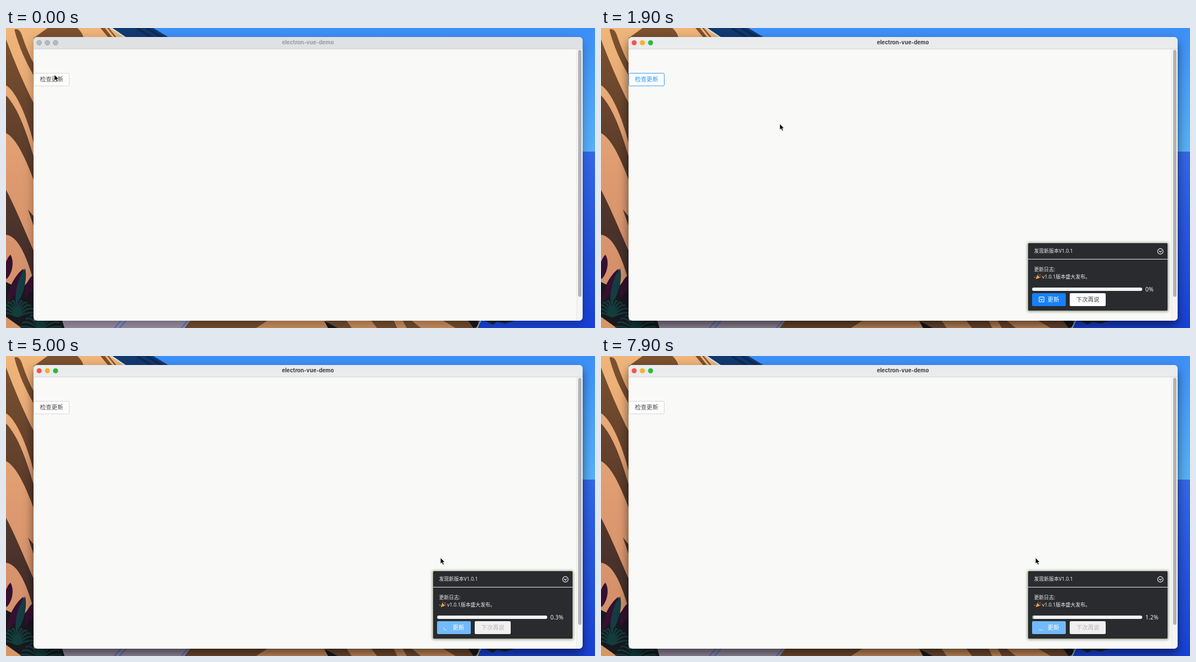
Animation, 1048 px wide and 534 px high, one loop 8 s. Source, as an HTML page:

```html
<!DOCTYPE html>
<html lang="zh-CN">
<head>
<meta charset="utf-8">
<title>electron-vue-demo</title>
<style>
  html, body { margin: 0; width: 100%; height: 100%; overflow: hidden; }
  svg { display: block; width: 1048px; height: 534px; }
  text { font: 10.3px "Noto Sans", "Noto Sans CJK SC", "Noto Sans CJK", sans-serif; }
  .title { font: 700 9.7px Inter, sans-serif; text-anchor: middle; fill: #3b3b3c; }
  .small { font-size: 8.8px; fill: #ececec; }

  .off, .on, .panel, .ring, .busy, .idle, .later { animation: 8s step-end infinite; }
  .off { animation-name: off; }
  .on { animation-name: on; }
  .panel { animation-name: panel; }
  .ring { animation-name: ring; }
  .busy { animation-name: busy; }
  .idle { animation-name: idle; }
  .later { animation-name: later; }
  @keyframes off { 0% { opacity: 1 } 8.75%, 100% { opacity: 0 } }
  @keyframes on { 0% { opacity: 0 } 8.75%, 100% { opacity: 1 } }
  @keyframes panel { 0% { opacity: 0 } 18.75%, 100% { opacity: 1 } }
  @keyframes ring {
    0%, 12.5%, 43.75%, 100% { opacity: 0 }
    8.75%, 41.25% { opacity: 1 }
  }
  @keyframes busy { 0% { opacity: 0 } 42.5%, 100% { opacity: 1 } }
  @keyframes idle { 0% { opacity: 1 } 42.5%, 100% { opacity: 0 } }
  @keyframes later {
    0% { fill: #fdfdfd; color: #444 }
    51.25%, 100% { fill: #f0f0f0; color: #b6b6b6 }
  }
  .later text { fill: currentColor; }

  .check { animation: check 8s linear infinite; stroke: currentColor; }
  .check text { stroke: none; animation: ink 8s linear infinite; }
  @keyframes check {
    0%, 10.6%, 46.9%, 100% { color: #d6d6d6 }
    15%, 42.5% { color: #3a9cf2 }
  }
  @keyframes ink {
    0%, 10.6%, 46.9%, 100% { fill: #484848 }
    15%, 42.5% { fill: #2b96f3 }
  }

  .spin { transform-origin: 783.5px 483.5px; animation: spin 1s steps(10) infinite; }
  @keyframes spin { to { transform: rotate(360deg) } }

  .cursor { animation: move 8s infinite; }
  @keyframes move {
    0% { transform: translate(86px, 83px) }
    2.5% { transform: translate(86px, 83px); animation-timing-function: steps(3) }
    6.25% { transform: translate(92px, 93px) }
    15% { transform: translate(92px, 93px); animation-timing-function: steps(3) }
    18.75% { transform: translate(160px, 115px); animation-timing-function: steps(4) }
    23.75% { transform: translate(318px, 170.5px); animation-timing-function: steps(4) }
    28.75% { transform: translate(560px, 330px); animation-timing-function: steps(4) }
    33.75% { transform: translate(780px, 470px); animation-timing-function: steps(3) }
    37.5% { transform: translate(795px, 484px) }
    43.75% { transform: translate(795px, 484px); animation-timing-function: steps(2) }
    46.25% { transform: translate(773px, 360px); animation-timing-function: step-end }
    48.75%, 100% { transform: translate(773px, 359px) }
  }
</style>
</head>
<body>
<svg viewBox="0 0 1048 534">
  <defs>
    <linearGradient id="sky" x2="0" y2="1">
      <stop stop-color="#3d8ff8"/><stop offset="1" stop-color="#58b1f8"/>
    </linearGradient>
    <linearGradient id="sea" x2="0" y2="1">
      <stop stop-color="#3468e8"/><stop offset="1" stop-color="#1841d4"/>
    </linearGradient>
    <linearGradient id="sand" gradientUnits="userSpaceOnUse" x2="0" y2="534">
      <stop stop-color="#f0b57a"/><stop offset=".5" stop-color="#dd9a70"/><stop offset="1" stop-color="#d08b68"/>
    </linearGradient>
    <linearGradient id="rock" gradientUnits="userSpaceOnUse" x2="0" y2="480">
      <stop stop-color="#7d5230"/><stop offset=".5" stop-color="#5a3b2b"/><stop offset="1" stop-color="#3c2a2c"/>
    </linearGradient>
    <filter id="blur" x="-10%" y="-10%" width="120%" height="120%"><feGaussianBlur stdDeviation="9"/></filter>
    <filter id="glow" x="-10%" y="-15%" width="120%" height="130%"><feGaussianBlur stdDeviation="2.2"/></filter>
    <clipPath id="bar"><rect x="767" y="462" width="196" height="6" rx="3"/></clipPath>
    <path id="head" d="M49 37V23Q49 16 56 16H1019Q1026 16 1026 23V37Z"/>
    <path id="leaf" d="M0 0C-9 -12 -8 -34 0 -44C9 -34 9 -12 0 0Z"/>
  </defs>

  <!-- desktop -->
  <rect width="1048" height="222" fill="url(#sky)"/>
  <rect y="220" width="1048" height="314" fill="url(#sea)"/>
  <path d="M180 0H262L292 18H200Z" fill="#123a70"/>
  <path d="M232 0L262 18M250 0L280 18" stroke="#0d2c58" stroke-width="4"/>
  <path d="M0 0H187L214 18H49V534H0Z" fill="url(#sand)"/>
  <path d="M187 0L214 18" stroke="#cfe3e0" stroke-width="2.5"/>
  <g fill="url(#rock)">
    <path d="M74 0H127Q136 8 138 18H49Z"/>
    <path d="M15 3C20 0 25 4 28 12C34 30 42 50 49 62V84C36 62 22 32 15 3Z"/>
    <path d="M168 0H176L190 18H183ZM180 0H183L198 18H195Z"/>
    <path d="M0 20C14 58 34 104 49 133V204C38 160 18 112 0 102Z"/>
    <path d="M0 120C18 138 34 176 49 228V270C34 230 18 196 0 187Z"/>
    <path d="M0 288C16 318 34 362 49 396V450C38 410 22 370 0 368Z"/>
    <path d="M39 323L49 335V352Z"/>
  </g>
  <path d="M40 534V518H340L318 534Z" fill="#988ba0"/>
  <path d="M207 518L193 534M216 518L202 534M326 518L312 534" stroke="#5778b8" stroke-width="2.5"/>
  <path d="M330 518H842V534H318Z" fill="#704b30"/>
  <g fill="#c58a5c">
    <path d="M445 534L465 521H568L586 534ZM606 521H650L660 534H615ZM690 521H706L713 534H696ZM722 521H778L800 534H738Z"/>
  </g>
  <path d="M566 521L590 534H573ZM820 518H838L842 530L832 534Z" fill="#17191f"/>
  <path d="M846 518L838 534" stroke="#83c4ed" stroke-width="2"/>
  <path d="M850 520Q880 514 905 521L888 526L874 523L866 528Z" fill="#10252d"/>

  <!-- plants -->
  <path d="M0 452Q18 462 30 462L49 440V521H100L104 534H0Z" fill="#17191f"/>
  <path d="M0 514L28 534H0Z" fill="#d69766"/>
  <g fill="#35102f">
    <use href="#leaf" transform="translate(1 447) rotate(9)"/>
    <use href="#leaf" transform="translate(2 488) rotate(26) scale(1.1 1.5)"/>
    <use href="#leaf" transform="translate(36 484) rotate(14)"/>
  </g>
  <use href="#leaf" transform="translate(18 492) rotate(14) scale(1 1.5)" fill="#153c43"/>
  <path d="M16 514L44 470" stroke="#21101f" stroke-width="3"/>
  <g id="fern" fill="none" stroke="#123d3c" stroke-width="3"></g>

  <!-- window -->
  <rect class="off" x="49" y="22" width="977" height="503" rx="7" filter="url(#blur)" fill-opacity=".3"/>
  <rect class="on" x="49" y="24" width="977" height="505" rx="7" filter="url(#blur)" fill-opacity=".55"/>
  <rect x="49" y="16" width="977" height="505" rx="7" fill="#f9f9f8"/>
  <g class="off">
    <use href="#head" fill="#dfe1e3"/>
    <g fill="#b9babb" stroke="#99999b" stroke-width=".8">
      <circle cx="59" cy="26.3" r="4.2"/><circle cx="73.6" cy="26.3" r="4.2"/><circle cx="88.2" cy="26.3" r="4.2"/>
    </g>
    <text class="title" x="537.2" y="29.4" style="fill:#98999b">electron-vue-demo</text>
  </g>
  <g class="on">
    <use href="#head" fill="#e9ebed"/>
    <circle cx="59" cy="26.3" r="4.5" fill="#f9544d"/>
    <circle cx="73.6" cy="26.3" r="4.5" fill="#f8b02b"/>
    <circle cx="88.2" cy="26.3" r="4.5" fill="#2bb83b"/>
    <text class="title" x="537.2" y="29.4">electron-vue-demo</text>
  </g>
  <path d="M49 37.5H1026" stroke="#d3d5d7"/>
  <path d="M1015.5 38H1026V514Q1026 521 1019 521H1015.5Z" fill="#f5f5f4"/>
  <path d="M1015.5 38V521" stroke="#e7e7e7"/>
  <rect x="1018" y="39" width="6" height="439.5" rx="3" fill="#b3b3b3"/>

  <g class="check">
    <rect x="49.5" y="80.5" width="63" height="22.5" rx="2" fill="#fdfdfd"/>
    <text x="60.5" y="95.2">检查更新</text>
  </g>

  <!-- update notice -->
  <g class="panel">
    <rect x="758.5" y="382" width="251" height="123" rx="3" fill="#596847" fill-opacity=".6" filter="url(#glow)"/>
    <rect x="760" y="383" width="248" height="120" rx="1.5" fill="#2a2b2e"/>
    <path d="M760 411.5H1008" stroke="#e4e4e4"/>
    <text class="small" x="770.5" y="400.2">发现新版本V1.0.1</text>
    <g fill="none" stroke="#f2f2f2" stroke-width="1.1">
      <circle cx="995.3" cy="397.5" r="4.9"/><path d="M992.9 396.5L995.3 399L997.7 396.5"/>
    </g>
    <text class="small" x="770.5" y="432.6">更新日志:</text>
    <text class="small" x="770.5" y="445.9">-</text>
    <path d="M773.5 447L776.2 439.5L781 444.4Z" fill="#eeb544"/>
    <path d="M777 439L778 437.6M779.5 441L782.4 438.6M780.5 443.2L782.8 443.4" stroke="#e0655c" stroke-width="1.2"/>
    <path d="M775.5 442L778.5 445.4" stroke="#b8703a"/>
    <text class="small" x="784.7" y="445.9">v1.0.1版本盛大发布。</text>

    <g clip-path="url(#bar)">
      <rect x="767" y="462" width="196" height="6" fill="#f3f4f4"/>
      <rect id="fill" x="767" y="462" width="0" height="6" fill="#32ab7d"/>
    </g>
    <text id="pct" x="968.6" y="468.6" fill="#ececec">0%</text>

    <g class="idle">
      <rect x="767" y="472" width="60" height="23" rx="2" fill="#1681fb"/>
      <g fill="none" stroke="#fff" stroke-width="1.1">
        <rect x="779.6" y="478.9" width="8.6" height="8.6" rx=".6"/><path d="M781.7 482.2L783.9 484.9L786.1 482.2"/>
      </g>
    </g>
    <g class="busy">
      <rect x="767" y="472" width="60" height="23" rx="2" fill="#72bafb"/>
      <path class="spin" d="M783.5 488.2A4.7 4.7 0 0 1 778.8 483.5" fill="none" stroke="#f4faff"/>
    </g>
    <text x="794.6" y="487.1" fill="#fff">更新</text>
    <g class="later">
      <rect x="834" y="472" width="64" height="23" rx="2"/>
      <text x="845.6" y="487.1">下次再说</text>
    </g>
  </g>

  <g class="cursor">
    <circle class="ring" cx=".6" cy="1" r="14.4" fill="none" stroke="#0b0b0b" stroke-width="2.4"/>
    <path d="M0 0V11L2.5 8.7L4.3 12.7L6.3 11.8L4.6 8H8Z" fill="#050505" stroke="#fff" stroke-width=".8" stroke-linejoin="round"/>
  </g>
</svg>
<script>
  const $ = id => document.getElementById(id);

  // fern fronds fan out from two roots
  let d = '';
  for (const [x, y, r] of [[20, 514, 34], [62, 540, 38]]) {
    for (let a = -165; a <= -15; a += 15) {
      const c = Math.cos(a * Math.PI / 180) * r, s = Math.sin(a * Math.PI / 180) * r;
      d += `M${x} ${y}q${c * .6} ${s * 1.1} ${c} ${s * .8}`;
    }
  }
  $('fern').innerHTML = `<path d="${d}"/>`;

  // download progress: [ms, tenths of a percent]
  const marks = [[0, 0], [4000, 0], [5000, 3], [6800, 7], [7900, 12], [8000, 12]];
  function tenths(t) {
    const i = marks.findIndex(m => m[0] > t);
    const [t0, v0] = marks[i - 1], [t1, v1] = marks[i];
    return Math.floor(v0 + (v1 - v0) * (t - t0) / (t1 - t0) + 1e-6);
  }

  let start, last;
  function tick(now) {
    start ??= now;
    const n = tenths((now - start) % 8000);
    if (n !== last) {
      last = n;
      $('pct').textContent = n / 10 + '%';
      $('fill').setAttribute('width', 196 * n / 1000);
    }
    requestAnimationFrame(tick);
  }
  requestAnimationFrame(tick);
</script>
</body>
</html>
```
